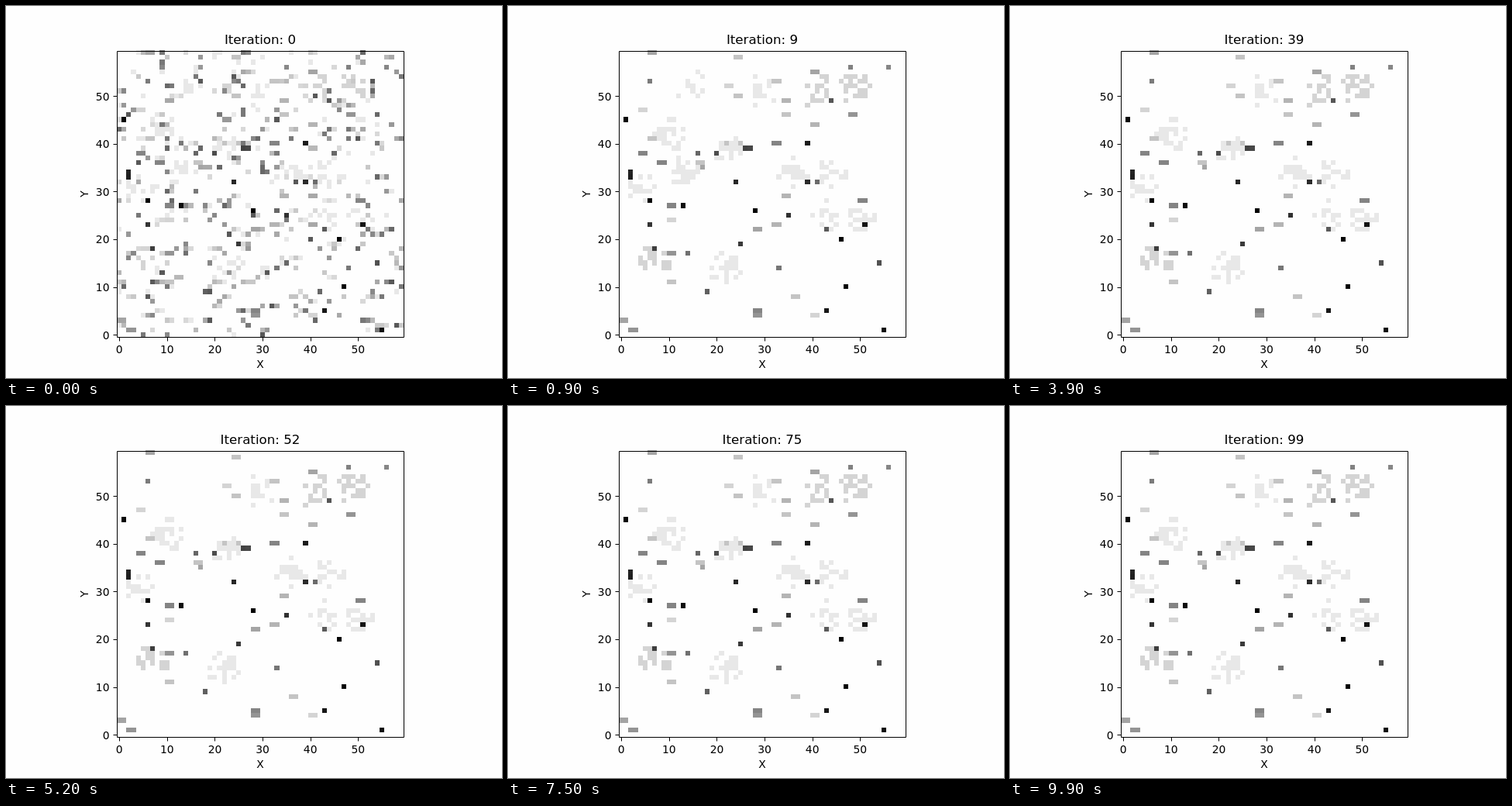
Recreate the animation shown at these times as an HTML page with a canvas. Size 640 by 480 pixels, loop 10 s.

```html
<!DOCTYPE html>
<html>
<head>
<meta charset="utf-8">
<style>
html, body { margin: 0; width: 640px; height: 480px; overflow: hidden; background: #fefefe; }
canvas, svg { position: absolute; left: 0; top: 0; }
text { font: 13.89px "DejaVu Sans", sans-serif; text-anchor: middle; }
#title { font-size: 16.67px; }
</style>
</head>
<body>
<canvas id="grid" width="640" height="480"></canvas>
<svg width="640" height="480">
  <path id="axes" fill="none" stroke="#000"/>
  <g id="labels"></g>
  <text id="title" x="328" y="49"></text>
  <text x="328" y="467">X</text>
  <text transform="translate(106 242.4) rotate(-90)">Y</text>
</svg>
<script>
const SIZE = 60, LAST = 99;
const $ = id => document.getElementById(id);
const ctx = $('grid').getContext('2d');

// Seeded value in 0..1 for a cell
function rnd(x, y, salt) {
  const s = Math.sin(x * 127.1 + y * 311.7 + salt * 74.7) * 43758.5453;
  return s - Math.floor(s);
}

// Lasting dots, from black to mid gray
const dots = [
  [28, 26], [46, 20], [47, 10], [6, 28], [1, 45], [13, 27], [55, 1], [51, 23],
  [43, 5], [39, 40], [2, 33], [2, 34], [24, 32], [39, 32], [35, 25], [6, 23],
  [25, 19], [7, 18], [26, 39], [27, 39], [20, 38], [54, 15], [44, 49], [43, 22],
  [18, 9], [16, 38], [41, 32], [14, 17], [33, 14], [6, 53], [48, 56], [56, 56]
];
// Centres of pale clusters
const lasting = [
  [43, 25], [44, 34], [41, 51], [29, 51], [22, 14], [4, 31],
  [7, 16], [36, 34], [10, 42], [23, 39], [49, 52], [50, 25]
];
const fading = [[15, 52], [13, 34]];

const cells = new Map();
const put = (x, y, gray, from = 0, to = LAST, fade = 0) =>
  cells.set(y * SIZE + x, { x, y, gray, from, to, fade });

// Short-lived noise in single cells and pairs, with a few lasting cells
function scatter() {
  for (let y = 0; y < SIZE; y++)
    for (let x = 0; x < SIZE; x++) {
      if (rnd(x, y, 1) < .07 || rnd(x >> 1, y, 2) < .075) {
        const gray = 232 - 16 * Math.floor(10 * rnd(x, y, 3) ** 1.8);
        put(x, y, gray, 0, Math.floor(8 * rnd(x, y, 4) ** 2), 12);
      }
      if (rnd(x >> 1, y, 5) < .018) put(x, y, 132 + 16 * Math.floor(6 * rnd(x >> 1, y, 6)));
    }
}

function cluster([cx, cy], gray, life) {
  for (let y = cy - 3; y <= cy + 3; y++)
    for (let x = cx - 3; x <= cx + 3; x++) {
      if (rnd(x, y, 7) > .75 - .17 * Math.hypot(x - cx, y - cy)) continue;
      const born = Math.max(0, Math.floor(12 * rnd(x, y, 8)) - 6);
      put(x, y, gray, born, life(x, y));
    }
}

scatter();
fading.forEach(c => cluster(c, 232, (x, y) => 10 + Math.floor(10 * rnd(x, y, 9))));
lasting.forEach((c, i) => cluster(c, i % 4 === 2 ? 212 : 232, () => LAST));
dots.forEach(([x, y], i) => put(x, y, Math.round(140 * (i / dots.length) ** 1.3)));

function drawAxes() {
  let d = 'M143.5 58.5H513.5V427.5H143.5Z';
  let text = '';
  for (let v = 0; v < SIZE; v += 10) {
    const x = 143.2 + 6.16 * (v + .5), y = 427.2 - 6.16 * (v + .5);
    d += `M${Math.round(x) + .5} 427.5v5M143.5 ${Math.round(y) + .5}h-5`;
    text += `<text x="${x}" y="448">${v}</text>` +
      `<text x="133.5" y="${Math.round(y + 5.5)}" style="text-anchor:end">${v}</text>`;
  }
  $('axes').setAttribute('d', d);
  $('labels').innerHTML = text;
}

// Cell edges on whole pixels
const edge = i => Math.ceil(i * 370 / SIZE - .5);

function drawCells(step) {
  ctx.clearRect(0, 0, 640, 480);
  for (const { x, y, gray, from, to, fade } of cells.values()) {
    if (step < from || step > to) continue;
    const g = Math.min(232, gray + fade * step);
    ctx.fillStyle = `rgb(${g},${g},${g})`;
    ctx.fillRect(143 + edge(x), 427 - edge(y + 1), edge(x + 1) - edge(x), edge(y + 1) - edge(y));
  }
}

let shown = -1;
function tick() {
  const step = Math.floor(performance.now() / 100) % (LAST + 1);
  if (step !== shown) {
    shown = step;
    $('title').textContent = 'Iteration: ' + step;
    drawCells(step);
  }
  requestAnimationFrame(tick);
}
drawAxes();
tick();
</script>
</body>
</html>
```
